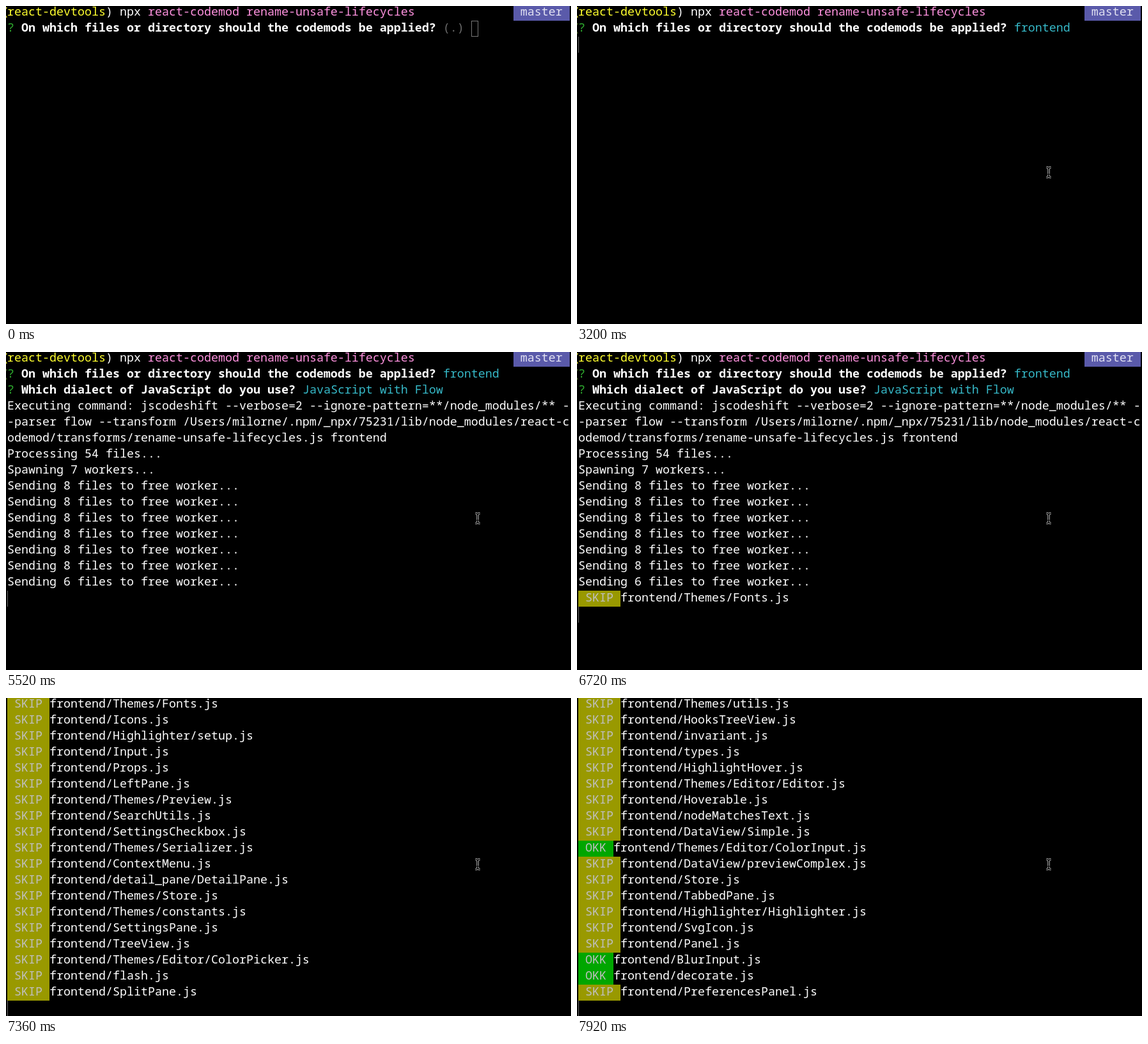
Write an HTML page that moves like this. It is 884 px wide and 497 px high and loops after 8 s.

```html
<!DOCTYPE html>
<html lang="en">
<head>
<meta charset="utf-8">
<title>Codemod in a terminal</title>
<style>
  html, body { margin: 0; width: 884px; height: 497px; overflow: hidden; background: #000; }
  #screen {
    position: absolute; left: 2px; top: -2px;
    font: 18.3333px/19px "Noto Sans Mono", monospace;
    font-variant-ligatures: none; color: #fff;
  }
  .row { position: relative; height: 25px; white-space: pre; }
  .bold { font-weight: 700; }
  .yellow { color: #ffff2e; }
  .pink { color: #ff92df; }
  .green { color: #2fae2f; }
  .cyan { color: #36b9c8; }
  .dim { color: #6c6c6c; }
  .skip, .okk, .branch { display: inline-block; height: 25px; color: #bfbfbf; }
  .skip { background: #990; }
  .okk { background: #00a600; }
  .branch { background: #5a5aaa; color: #e2e2f2; }
  .clipped, .ghost { position: absolute; left: -8px; color: #ffff2e; }
  .ghost { color: #4c6a1c; }
  .pointer {
    position: absolute; left: 0; top: 0; width: 11px; height: 25px; background: #36b9c8;
    clip-path: polygon(1px 4px, 4px 4px, 10px 10.5px, 4px 17px, 1px 17px, 6px 10.5px);
  }
  #caret {
    position: absolute; box-sizing: border-box; width: 1px; height: 25px;
    background: #666;
  }
  #caret.idle { width: 11px; background: none; border: 1px solid #777; }
  #mouse { position: absolute; left: 0; top: 0; overflow: visible; fill: none; }
</style>
</head>
<body>
<div id="screen"><div id="rows"></div><div id="caret"></div></div>
<svg id="mouse" width="1" height="1">
  <defs>
    <path id="beam" d="M-3.5-7.7Q0-7.7 0-5V5Q0 7.7-3.5 7.7M3.5-7.7Q0-7.7 0-5M0 5Q0 7.7 3.5 7.7M-1.6 3H1.6"/>
  </defs>
  <use href="#beam" stroke="#c4c4c4" stroke-width="3.4"/>
  <use href="#beam" stroke="#000" stroke-width="1.5"/>
</svg>
<script>
const LOOP = 8000, TICK = 80, COL = 11, ROW = 25, VISIBLE = 20;

const FILES = `Themes/Fonts Icons Highlighter/setup Input Props LeftPane Themes/Preview
  SearchUtils SettingsCheckbox Themes/Serializer ContextMenu detail_pane/DetailPane
  Themes/Store Themes/constants SettingsPane TreeView Themes/Editor/ColorPicker flash
  SplitPane detail_pane/DetailPaneSection Breadcrumb dirToDest Themes/Editor/ColorGroups
  Container Draggable provideStore Node Themes/Themes keyboardNav Themes/utils
  HooksTreeView invariant types HighlightHover Themes/Editor/Editor Hoverable
  nodeMatchesText DataView/Simple Themes/Editor/ColorInput DataView/previewComplex Store
  TabbedPane Highlighter/Highlighter SvgIcon Panel BlurInput decorate
  PreferencesPanel`.split(/\s+/);
const CHANGED = new Set(["Themes/Editor/ColorInput", "BlurInput", "decorate"]);

// [time, value]: letters typed and files reported so far
const TYPED = [[1680, 1], [1760, 2], [1920, 3], [2000, 4], [2160, 5], [2400, 6], [2560, 7], [2640, 8]];
const DONE = [[6720, 1], [6800, 3], [6960, 5], [7040, 8], [7120, 10], [7200, 13], [7280, 16],
  [7360, 19], [7440, 22], [7520, 25], [7680, 29], [7760, 35], [7840, 42], [7920, 48]];
const FOCUS = 720, ANSWER = 3200, LIST = 3280, DOWN = 4560, RUN = 5280, WORK = 5520;

const valueAt = (steps, t) => steps.reduce((v, [at, next]) => t >= at ? next : v, 0);
const span = (cls, text = "") => `<span class="${cls}">${text}</span>`;

const PROMPT = span("clipped", "(") + span("yellow", "react-devtools") + ") npx " +
  span("pink", "react-codemod rename-unsafe-lifecycles") + " ".repeat(14) + span("branch", " master ");
const COMMAND = [
  "Executing command: jscodeshift --verbose=2 --ignore-pattern=**/node_modules/** -",
  "-parser flow --transform /Users/milorne/.npm/_npx/75231/lib/node_modules/react-c",
  "odemod/transforms/rename-unsafe-lifecycles.js frontend"
];
const WORKERS = ["Processing 54 files...", "Spawning 7 workers...",
  ...[8, 8, 8, 8, 8, 8, 6].map(n => `Sending ${n} files to free worker...`)];

const ask = (question, reply) => span("green", "?") + " " + span("bold", question) + " " + reply;
const option = (name, on) => on ? span("pointer") + span("cyan", "  " + name) : "  " + name;
const report = file => (CHANGED.has(file) ? span("okk", " OKK ") : span("skip", " SKIP ")) +
  `frontend/${file}.js`;

function terminal(t) {
  const typed = valueAt(TYPED, t);
  const word = "frontend".slice(0, typed);
  const reply = t >= ANSWER ? span("cyan", word) : typed ? word : span("dim", "(.)");
  const lines = [PROMPT, (t >= ANSWER ? span("ghost", "(") : "") +
    ask("On which files or directory should the codemods be applied?", reply)];
  if (t < ANSWER) return { lines, caret: [typed ? 62 + typed : 66, 1] };
  if (t < LIST) return { lines, caret: [0, 2] };

  const choice = t >= RUN ? span("cyan", "JavaScript with Flow")
    : t >= DOWN ? "" : span("dim", "(Use arrow keys)");
  lines.push(ask("Which dialect of JavaScript do you use?", choice));
  if (t < RUN) {
    const picked = t >= DOWN ? 1 : 0;
    ["JavaScript", "JavaScript with Flow", "TypeScript"]
      .forEach((name, i) => lines.push(option(name, i === picked)));
    return { lines, caret: null };
  }
  lines.push(...COMMAND);
  if (t >= WORK) lines.push(...WORKERS);
  lines.push(...FILES.slice(0, valueAt(DONE, t)).map(report));
  return { lines, caret: [0, lines.length] };
}

function mouseAt(t) {
  if (t < 240) return null;
  const glide = (start, length) => {
    const p = Math.min(1, Math.max(0, (t - start) / length));
    return p * p * (3 - 2 * p);
  };
  const a = glide(240, 400), b = glide(880, 320);
  return [625 + 30 * a + 83 * b, 405 - 210 * a + 65 * b];
}

const [rows, caretBox, mouse] = ["rows", "caret", "mouse"].map(id => document.getElementById(id));

function draw(t) {
  const { lines, caret } = terminal(t);
  const scroll = Math.max(0, lines.length + 1 - VISIBLE);
  rows.innerHTML = lines.slice(scroll).map(line => `<div class="row">${line}</div>`).join("");

  caretBox.hidden = !caret;
  caretBox.className = t < FOCUS ? "idle" : "";
  if (caret) {
    caretBox.style.left = caret[0] * COL + "px";
    caretBox.style.top = (caret[1] - scroll) * ROW + "px";
  }

  const pos = mouseAt(t);
  mouse.style.visibility = pos ? "visible" : "hidden";
  if (pos) mouse.style.transform = `translate(${pos[0]}px, ${pos[1]}px)`;
}

const start = performance.now();
let last = -1;
function loop() {
  const t = (performance.now() - start) % LOOP;
  const tick = Math.floor(t / TICK);
  if (tick !== last) draw((last = tick) * TICK);
  requestAnimationFrame(loop);
}
loop();
</script>
</body>
</html>
```
